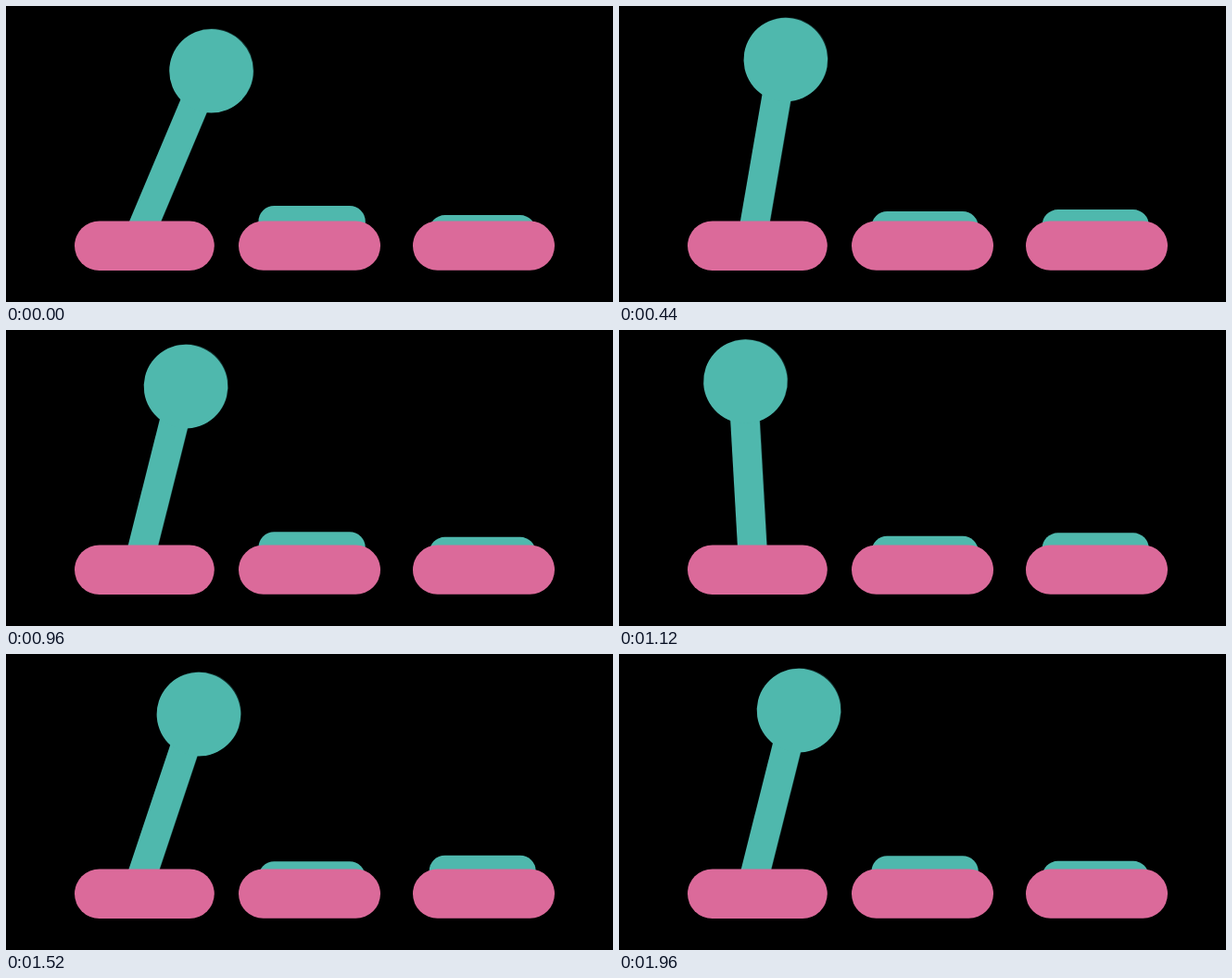
An HTML page for the animation above (2000 ms loop, 655 by 320 pixels).

```html
<!DOCTYPE html>
<html lang="en">
<head>
<meta charset="utf-8">
<title>Joystick and buttons</title>
<style>
  html, body { margin: 0; width: 100%; height: 100%; overflow: hidden; background: #000; }
  svg { display: block; width: 655px; height: 320px; }
  .teal { fill: #4fb8ad; }
  .pink { fill: #db6a9a; }
  .shade { fill: #12302e; }
</style>
</head>
<body>
<svg viewBox="0 0 655 320">
  <defs>
    <g id="stick">
      <rect x="-18.6" y="-185" width="31.5" height="195"/>
      <circle cy="-191.7" r="45.3"/>
    </g>
  </defs>
  <use id="stickShade" class="shade" href="#stick"/>
  <use id="stickBody" class="teal" href="#stick"/>
  <rect id="capA" class="teal" x="272.4" width="115.4" height="40" rx="17"/>
  <rect id="capB" class="teal" x="456.6" width="115.2" height="40" rx="17"/>
  <g class="pink">
    <rect x="74" y="232.4" width="150.8" height="53.6" rx="26.8"/>
    <rect x="251" y="232.6" width="153" height="53.2" rx="26.6"/>
    <rect x="439" y="232.6" width="153" height="53.2" rx="26.6"/>
  </g>
</svg>
<script>
  const LOOP = 2000, STEP = 40;
  const SWING = 500, PRESS = 1000 / 3;
  const PIVOT = { x: 147.3, y: 247 };
  const part = id => document.getElementById(id);

  // Linear there-and-back: 0 at the start of a period, 1 halfway.
  const pingPong = (t, period) => 1 - Math.abs(1 - 2 * (t % period) / period);
  const mix = (a, b, k) => a + (b - a) * k;

  function placeStick(id, angle, dx, dy) {
    part(id).setAttribute('transform',
      `translate(${PIVOT.x + dx} ${PIVOT.y + dy}) rotate(${angle})`);
  }

  function render(ms) {
    const t = Math.floor((ms % LOOP) / STEP) * STEP;
    const angle = mix(22.78, -31.45, pingPong(t, SWING));
    const press = pingPong(t, PRESS);
    placeStick('stickShade', angle, 0.8, -0.6);
    placeStick('stickBody', angle, 0, 0);
    part('capA').setAttribute('y', mix(216, 225.4, press));
    part('capB').setAttribute('y', mix(226.1, 216.7, press));
  }

  let start;
  function tick(now) {
    start ??= now;
    render(now - start);
    requestAnimationFrame(tick);
  }
  render(0);
  requestAnimationFrame(tick);
</script>
</body>
</html>
```
